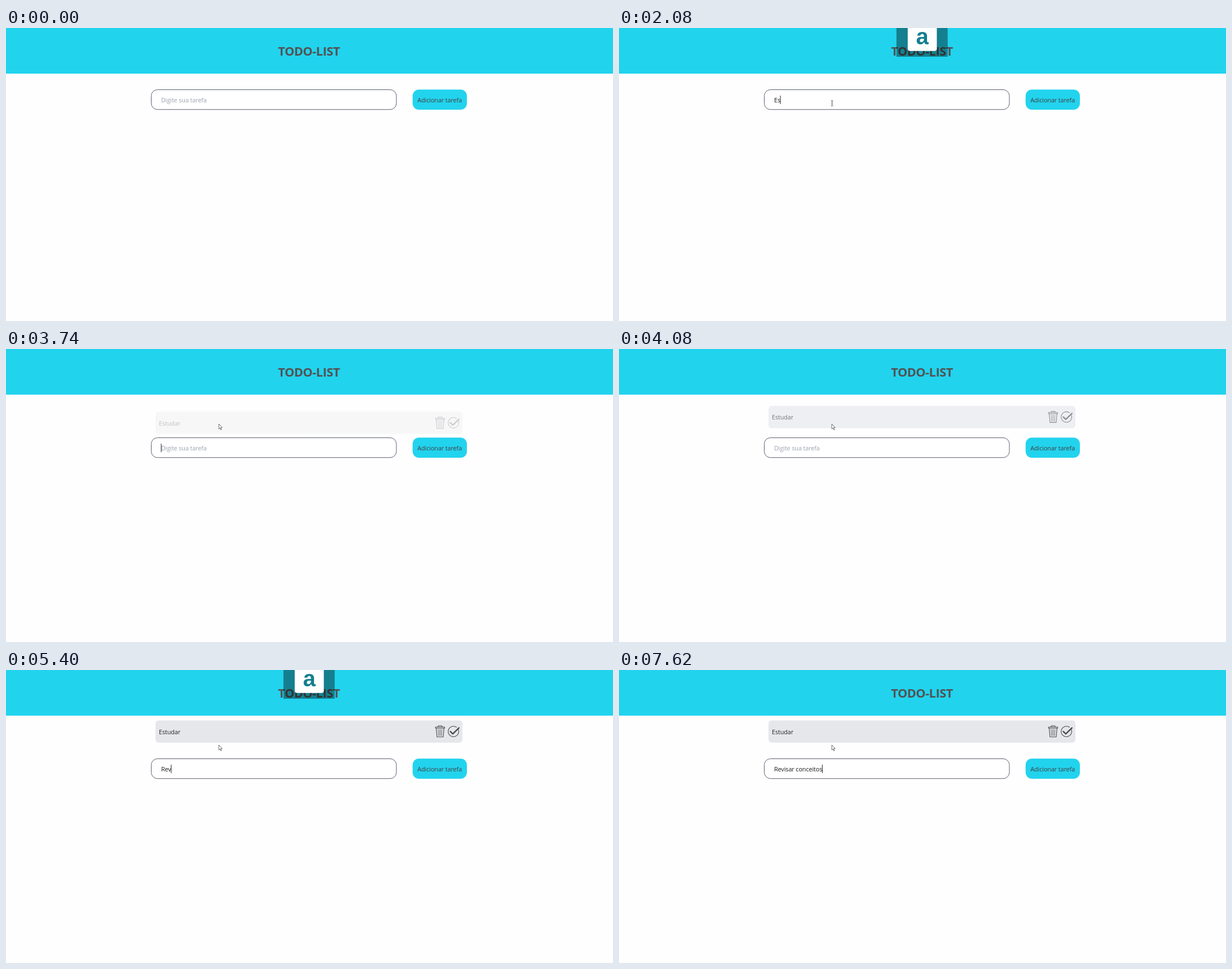
An HTML page for the animation above (8 s loop, 1076 by 520 pixels).

```html
<!DOCTYPE html>
<html lang="pt">
<head>
<meta charset="utf-8">
<title>Todo list</title>
<style>
  html, body { margin: 0; width: 100%; height: 100%; overflow: hidden; background: #fefefe; }
  svg { display: block; width: 1076px; height: 520px; }
  text { font: 10.9px "Open Sans", "Noto Sans", sans-serif; letter-spacing: -.13px; white-space: pre; }
  .title { font-size: 21.6px; font-weight: 700; letter-spacing: -.4px; fill: #525252; }
  .mid { text-anchor: middle; }
  .key { font: bold 40px "Liberation Sans", Arial, sans-serif; letter-spacing: 0; fill: #147f8f; }
  .line { fill: none; stroke: #45484d; stroke-linecap: round; stroke-linejoin: round; }
</style>
</head>
<body>
<svg viewBox="0 0 1076 520">
  <rect width="1076" height="520" fill="#fefefe"/>
  <rect width="1076" height="81" fill="#22d3ee"/>
  <text class="title mid" x="537" y="48.8">TODO-LIST</text>

  <g id="form">
    <rect x="257.5" y="109.5" width="434.5" height="35.2" rx="11" fill="#fff" stroke="#5b6070"/>
    <text id="hint" x="275" y="132" fill="#9ca3af">Digite sua tarefa</text>
    <text id="typed" x="275" y="132" fill="#1c1c1c"></text>
    <rect id="caret" y="120" width="1" height="15" fill="#222"/>
    <rect x="720.8" y="109.3" width="96.2" height="35.7" rx="11.3" fill="#22d3ee"/>
    <text class="mid" x="768.7" y="131.5" fill="#404040">Adicionar tarefa</text>
  </g>

  <g id="item">
    <rect x="265" width="544" height="39.5" rx="5.6" fill="#e5e7eb"/>
    <text x="271" y="24.3" fill="#262626">Estudar</text>
    <g class="line">
      <path d="M761.3 13.4V11.6H777.7V13.4ZM766 11.4V9.5H773V11.4" stroke-width="1"/>
      <path d="M762.6 13.6L764 29.3H775L776.4 13.6" stroke-width="1.1"/>
      <path d="M766 16L766.7 27M768.4 16V27M770.6 16V27M773 16L772.3 27" stroke-width=".9" stroke="#6b6e73"/>
      <path d="M801 14.6A9.3 9.3 0 1 1 798.5 12" stroke-width="1.1"/>
      <path d="M787.6 19.6L792 23.8L803 13.2" stroke-width="2.3"/>
    </g>
  </g>

  <g id="overlay">
    <rect x="491.8" width="90.8" height="51" fill="#000" opacity=".4"/>
    <path d="M511.8 0H563.4V36.5Q563.4 40.8 559.1 40.8H516.1Q511.8 40.8 511.8 36.5Z" fill="#fff"/>
    <text id="key" class="key mid" x="537.6"></text>
  </g>

  <path id="arrow" d="M0 0V9L2.1 7.1L3.5 10.4L4.8 9.9L3.4 6.7L6 6.4Z" fill="#fff" stroke="#4a4a4a" stroke-width=".8"/>
  <path id="beam" d="M376 128.5H377M378.5 128.5H379.5M377.75 129V138M376 138.5H377M378.5 138.5H379.5" fill="none" stroke="#3c3c3c"/>
</svg>
<script>
const LOOP = 8000, BLINK = 530, ADDED = 3590;
const FADE_START = 3467, FADE = 1000;
const words = [
  { text: "Estudar", keys: [1810, 2080, 2340, 2400, 2530, 2800, 3060] },
  { text: "Revisar conceitos", keys: [4670, 4940, 5400, 5600, 5670, 5870, 6070, 6280,
      6420, 6490, 6750, 6820, 7020, 7150, 7280, 7420, 7620] }
];
// moments at which the caret becomes visible again
const resets = [1130, ...words[0].keys, 3380, 4410, ...words[1].keys];
const capsLock = [
  { on: 1600, off: 1940, end: 3060 },
  { on: 4410, off: 4800, end: 5930 }
];

const $ = id => document.getElementById(id);
const form = $("form"), hint = $("hint"), typed = $("typed"), caret = $("caret");
const item = $("item"), overlay = $("overlay"), key = $("key");
const arrow = $("arrow"), beam = $("beam");

const clamp = v => Math.max(0, Math.min(1, v));
const mix = (a, b, p) => a + (b - a) * p;
const ease = p => p * p * (3 - 2 * p);
const show = (el, on) => el.setAttribute("visibility", on ? "visible" : "hidden");
const move = (el, x, y) => el.setAttribute("transform", `translate(${x} ${y})`);

function drawForm(t) {
  const word = words[t < ADDED ? 0 : 1];
  const count = word.keys.filter(k => k <= t).length;
  move(form, 0, t < ADDED ? 0 : 48);
  typed.textContent = word.text.slice(0, count);
  show(hint, !count);

  const last = resets.filter(r => r <= t).pop();
  const lit = t >= 1150 && Math.floor((t - last) / BLINK) % 2 === 0;
  caret.setAttribute("x", 274.6 + (count ? typed.getComputedTextLength() : 0));
  show(caret, lit);
}

function drawItem(t) {
  const p = clamp((t - FADE_START) / FADE);
  show(item, t >= ADDED);
  item.setAttribute("opacity", p);
  move(item, 0, 89.5 + 30 * (1 - p));
}

function drawOverlay(t) {
  const state = capsLock.find(c => t >= c.on && t < c.end);
  show(overlay, state);
  if (!state) return;
  const upper = t < state.off;
  key.textContent = upper ? "A" : "a";
  key.setAttribute("y", upper ? 32 : 28.5);
}

function drawPointer(t) {
  const typing = t >= 1000 && t < ADDED;
  const p = ease(clamp((t - 130) / 800));
  show(beam, typing);
  show(arrow, t >= 130 && !typing);
  if (t < ADDED) move(arrow, mix(871, 377.2, p), mix(483, 135, p));
  else move(arrow, 377.2, 133);
}

function draw(t) {
  drawForm(t);
  drawItem(t);
  drawOverlay(t);
  drawPointer(t);
}

const start = performance.now();
function tick() {
  draw((performance.now() - start) % LOOP);
  requestAnimationFrame(tick);
}
tick();
</script>
</body>
</html>
```
